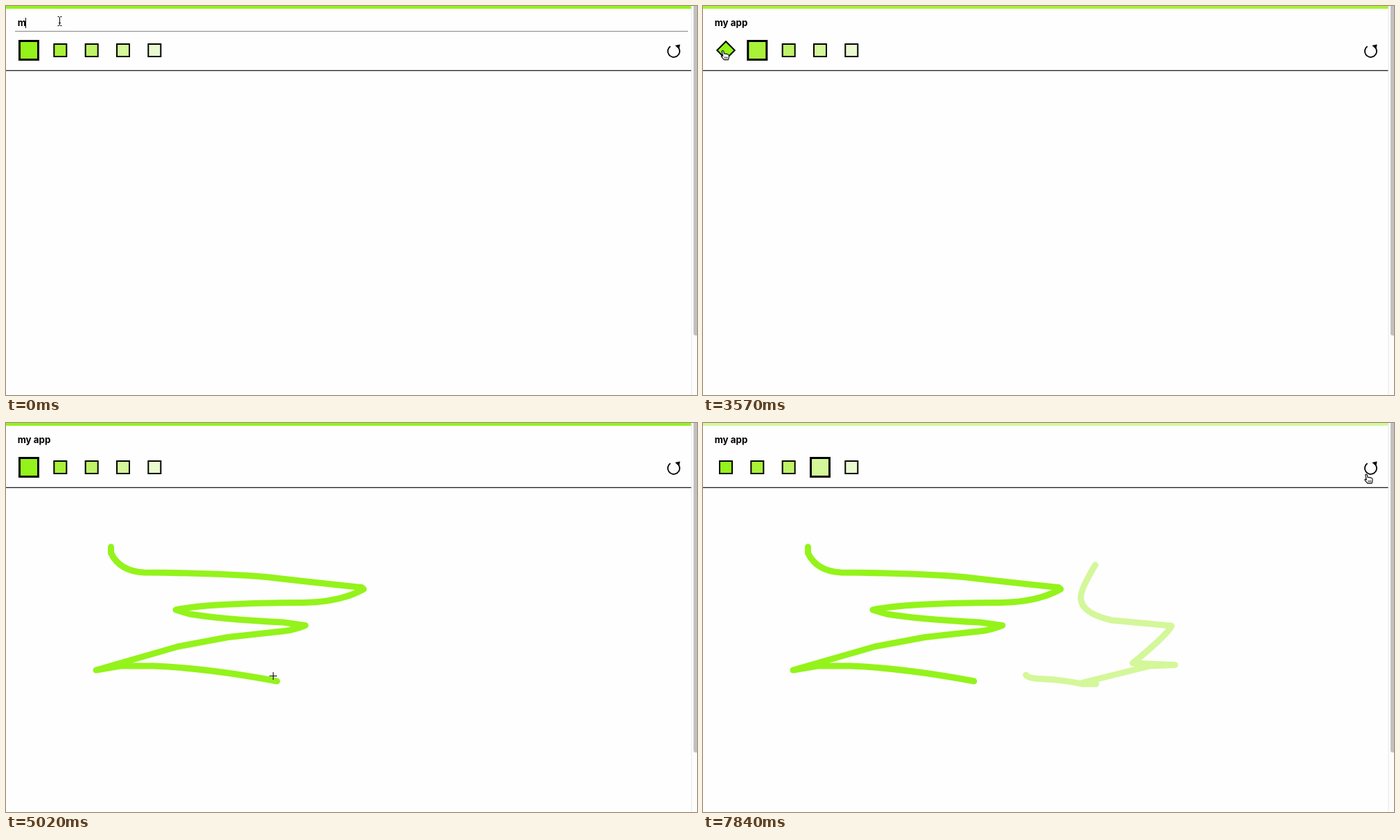
These frames come from a looping animation (997 by 562 pixels, 7990 ms). An HTML page:

```html
<!DOCTYPE html>
<html lang="en">
<head>
<meta charset="utf-8">
<title>Drawing app</title>
<style>
html, body { margin: 0; width: 100%; height: 100%; overflow: hidden; background: #fefefe; }
svg { display: block; width: 997px; height: 562px; }
text { font: 700 13.333px Inter, Roboto, sans-serif; white-space: pre; }
.pen { fill: none; stroke-width: 9; stroke-linecap: round; stroke-linejoin: round; }
.line { fill: none; stroke: #000; }
</style>
</head>
<body>
<svg viewBox="0 0 997 562">
  <rect width="997" height="562" fill="#fefefe"/>
  <rect id="bar" width="989" height="4"/>
  <text id="label" x="16.67" y="29.33"></text>
  <rect id="caret" y="17" width="1" height="15"/>
  <rect id="underline" x="13" y="36" width="971" height="1" fill="#858585"/>
  <rect y="92.67" width="989" height="1.33" fill="#222"/>
  <g id="swatches"></g>
  <path class="line" stroke-width="1.8" d="M958.6 58.2A8.6 8.6 0 1 0 970.4 60.2"/>
  <path d="M965.3 57L972.6 55.4L971.2 62.6Z"/>
  <path id="zigzag" class="pen" d="M151.5 179V188Q164 214 199 216Q310 217 376 222.5Q440 230 513 237.5L516 240
    Q482 259 430 259.5Q290 260 245 270L265 276Q310 283.5 400 288L432 292.5Q415 299 402 300.5
    L320 309.5L248 323L130 357L165 351H212Q290 354 391 373"/>
  <path id="hook" class="pen" d="M466 364Q469 370 495 370Q518 371 548 377H567L548 375L645 351L681 349.5L620 347
    Q670 306 676 293L590 285Q545 275 545 252Q545 240 566 205"/>
  <rect x="989" width="8" height="562" fill="#fcfcfc"/>
  <rect x="988.5" width="1" height="562" fill="#e7e7e7"/>
  <rect x="992" y="-10" width="10" height="486" rx="3" fill="#c1c1c1"/>
  <path id="beam" class="line" d="M-3 -6.5H-1L0 -5.5L1 -6.5H3M0 -5.5V5.5M-3 6.5H-1L0 5.5L1 6.5H3M-1.5 2.5H1.5"/>
  <path id="cross" class="line" d="M-5.5 0H5.5M0 -5.5V5.5"/>
  <g id="hand">
    <path d="M-1.3 .4Q0 -1.4 1.3 .6L2 4.2Q3.2 3.2 4.3 4.4Q5.6 3.6 6.5 4.8Q8.2 4.4 8.8 6.4L9 9.2L8 12.6H1.8L-1.8 8.4Q-2.6 6.8 -1.2 6.5L.3 7.7Z"
      fill="#fff" stroke="#000" stroke-width="1.1" stroke-linejoin="round"/>
    <path class="line" stroke-width=".8" d="M3 8.4V11M4.8 8.4V11M6.6 8.4V11"/>
  </g>
</svg>
<script>
const LOOP = 7990, MOUSE_START = 2240, STEP = 147.37;
const COLORS = ['#94f31b', '#a9f238', '#bff367', '#d4f79a', '#e9fad1'];
const ROW_Y = 64, RESET_X = 963.5;
const swatchX = i => 33 + 45.33 * i;
const byId = id => document.getElementById(id);

const TEXT = 'my app';
const typed = [[0, 1], [150, 2], [1190, 3], [1340, 4], [1640, 6]];

// Everything below is timed in steps after MOUSE_START.
const BLUR = 3;
const clicks = [[-9, 0], [5.7, 1], [10, 0], [24.65, 3]];
const hovers = [[1, 4.6, 6.7], [0, 7, 11.7], [3, 22.6, 24.85]];
const moves = [
  { from: 0.5, to: 2.5, x: 95, y: 133 },
  { from: 4, to: 5, x: 79, y: 70 },
  { from: 6.2, to: 8, x: 28.5, y: 65 },
  { from: 11.2, to: 12.2, x: 151.5, y: 179 },
  { from: 12.9, to: 18.6, pen: 'zigzag', color: 0 },
  { from: 18.6, to: 22.8, x: 168, y: 62 },
  { from: 24.6, to: 26, x: 423.5, y: 150 },
  { from: 26, to: 30, x: 468, y: 377 },
  { from: 31.9, to: 36.4, pen: 'hook', color: 3 },
  { from: 36.4, to: 37.6, x: 957, y: 74.5 }
];
const LEAD = 9; // how far the pointer runs ahead of the ink

const clamp = u => Math.min(1, Math.max(0, u));
const progress = (m, k) => clamp((k - m.from) / (m.to - m.from));
const inked = (m, k) => progress(m, k) ** 1.31;
const smooth = u => u * u * (3 - 2 * u);
const settle = age => 1 - (1 - clamp(age / 2)) ** 2;
const last = (list, t) => list.filter(e => e[0] <= t).pop();

const strokes = moves.filter(m => m.pen);
for (const m of strokes) {
  m.path = byId(m.pen);
  m.length = m.path.getTotalLength();
  m.path.setAttribute('stroke', COLORS[m.color]);
}

const swatches = COLORS.map(color => {
  const r = document.createElementNS('http://www.w3.org/2000/svg', 'rect');
  const attrs = { x: -9, y: -9, width: 18, height: 18, fill: color, stroke: '#000', 'stroke-width': 2 };
  for (const name in attrs) r.setAttribute(name, attrs[name]);
  byId('swatches').append(r);
  return r;
});

function pointer(k) {
  let x = 77.5, y = 22;
  for (const m of moves.filter(m => k >= m.from)) {
    if (m.pen) {
      ({ x, y } = m.path.getPointAtLength(inked(m, k) * m.length + LEAD));
    } else {
      const u = smooth(progress(m, k));
      x += (m.x - x) * u;
      y += (m.y - y) * u;
    }
  }
  return [x, y];
}

function cursorAt(x, y) {
  if (y < 38) return 'beam';
  const targets = [RESET_X, ...COLORS.map((c, i) => swatchX(i))];
  const over = Math.abs(y - ROW_Y) < 15 && targets.some(tx => Math.abs(x - tx) < 15);
  return over ? 'hand' : 'cross';
}

function selection(i, k) {
  let v = 0;
  for (const [at, picked] of clicks) v += ((picked === i ? 1 : 0) - v) * settle(k - at);
  return v;
}

function tilt(i, k) {
  return hovers.filter(h => h[0] === i)
    .reduce((sum, [, enter, leave]) => sum + 45 * (settle(k - enter) - settle(k - leave)), 0);
}

function show(id, on) {
  byId(id).style.display = on ? '' : 'none';
}

function draw(t) {
  const k = Math.max(0, Math.floor((t - MOUSE_START + 22) / STEP));

  byId('label').textContent = TEXT.slice(0, last(typed, t)[1]);
  byId('caret').setAttribute('x', Math.floor(16.8 + byId('label').getComputedTextLength()));
  show('caret', t < 600 || (t >= 1190 && t < MOUSE_START));
  show('underline', k < BLUR);

  byId('bar').setAttribute('fill', COLORS[last(clicks, k)[1]]);
  swatches.forEach((r, i) => {
    const scale = 1 + 0.5 * selection(i, k);
    r.setAttribute('transform', `translate(${swatchX(i)} ${ROW_Y}) rotate(${tilt(i, k)}) scale(${scale})`);
  });

  for (const m of strokes) {
    show(m.pen, k > m.from);
    m.path.setAttribute('stroke-dasharray', `${inked(m, k) * m.length + 0.1} 9999`);
  }

  const [x, y] = pointer(k);
  const cursor = cursorAt(x, y);
  for (const id of ['beam', 'hand', 'cross']) show(id, id === cursor);
  const snap = v => cursor === 'cross' ? Math.floor(v) + 0.5 : v;
  byId(cursor).setAttribute('transform', `translate(${snap(x)} ${snap(y)})`);
}

const start = performance.now();
function tick() {
  draw((performance.now() - start) % LOOP);
  requestAnimationFrame(tick);
}
tick();
</script>
</body>
</html>
```
